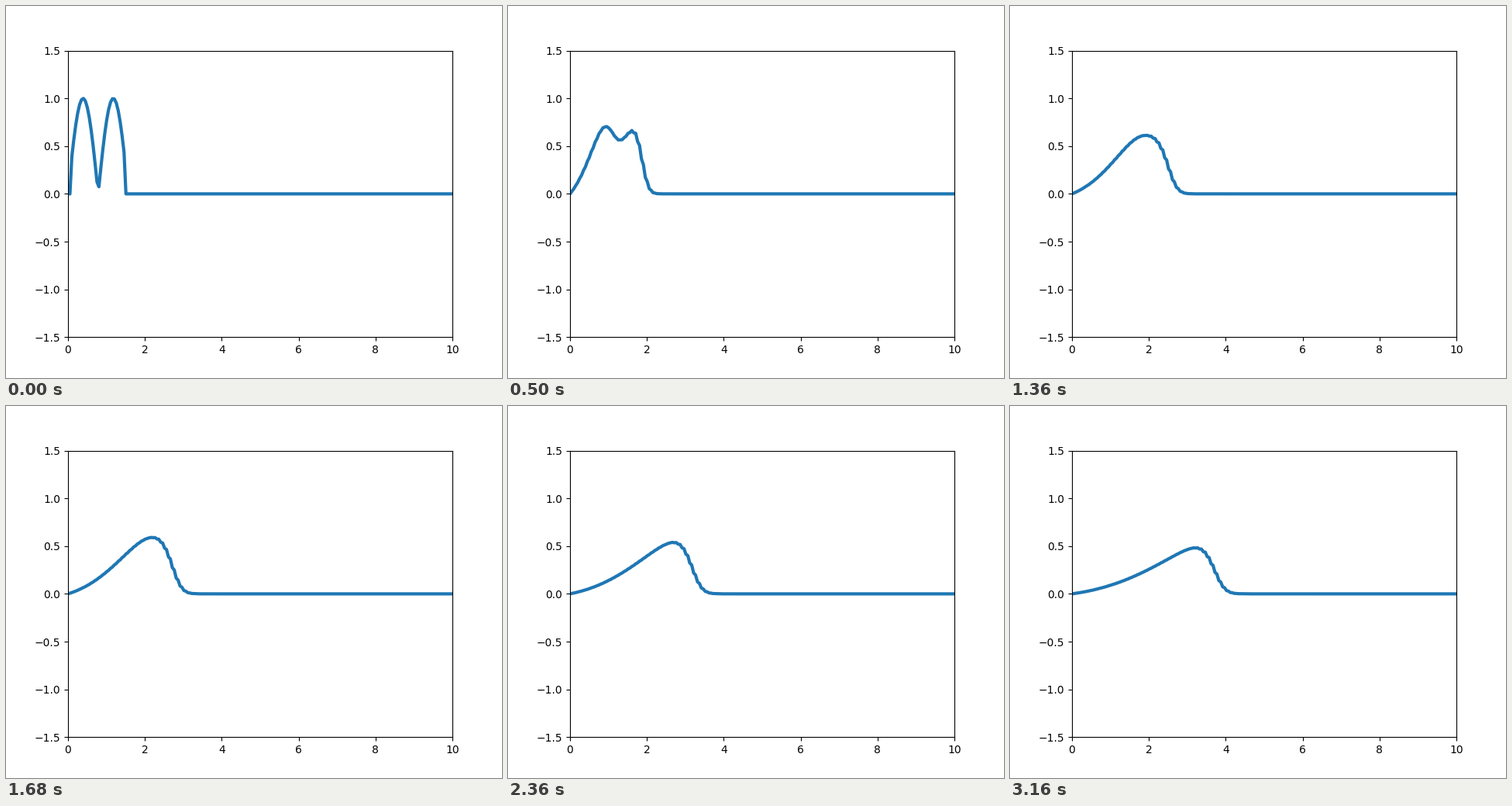
Animation of 640 by 480 pixels, one loop 3180 ms. Source, as a matplotlib script:

```python
import numpy as np
import matplotlib.pyplot as plt
from matplotlib.animation import FuncAnimation

N = 200
STEPS = 159
COURANT = 0.5

x = np.linspace(0, 10, N)


def flux(u):
    # wave speed is sqrt(u)
    return 2 / 3 * u ** 1.5


def step(u):
    """One Lax-Friedrichs step with both ends held at zero."""
    f = flux(u)
    new = np.zeros_like(u)
    new[1:-1] = 0.5 * (u[2:] + u[:-2]) - 0.5 * COURANT * (f[2:] - f[:-2])
    return np.maximum(new, 0)


def solve():
    states = [np.where((x >= 0.1) & (x <= 1.5), np.abs(np.sin(4 * x)), 0)]
    while len(states) < STEPS:
        states.append(step(states[-1]))
    return states


states = solve()

fig, ax = plt.subplots(figsize=(6.4, 4.8), dpi=100)
ax.set_xlim(0, 10)
ax.set_ylim(-1.5, 1.5)
line, = ax.plot(x, states[0], lw=3)


def update(n):
    line.set_ydata(states[n])
    return line,


anim = FuncAnimation(fig, update, frames=STEPS, interval=20,
                     repeat=True, repeat_delay=0)
plt.show()
```
